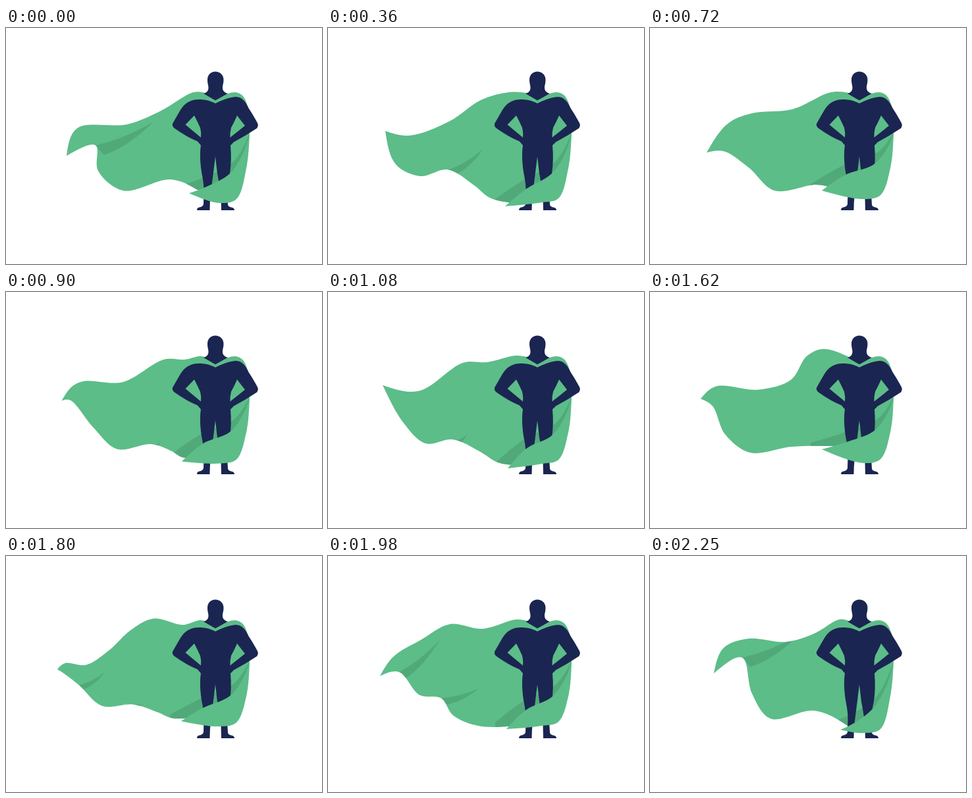
Write an HTML page with a canvas that moves like this. It is 480 px wide and 360 px high and loops after 2.34 s.

```html
<!DOCTYPE html>
<html lang="en">
<head>
<meta charset="utf-8">
<title>Cape in the wind</title>
<style>
html, body { margin: 0; width: 100%; height: 100%; overflow: hidden; background: #fff; }
canvas { display: block; width: 480px; height: 360px; }
</style>
</head>
<body>
<canvas id="stage" width="480" height="360"></canvas>
<script>
const ctx = document.getElementById('stage').getContext('2d');
const GREEN = '#5cbd88', SHADE = '#51a97a', NAVY = '#1b2551';
const LOOP = 2340, STEP = 90;
const SHOULDER = [370, 160], NECK = [302, 99];
const TOP_WAVES = 10, LOW_WAVES = 9;

const mix = (a, b, u) => a.map((v, i) => v + (b[i] - v) * u);
const add = (p, x, y) => [p[0] + x, p[1] + y];
const dist = (a, b) => Math.hypot(a[0] - b[0], a[1] - b[1]);
const pairs = n => Array.from({ length: n.length / 2 }, (_, i) => [n[2 * i], n[2 * i + 1]]);
const poses = [];

// An edge runs from the loose corner past its wave points to the body.
// Waves are numbered, so each keeps its identity while it drifts left.
const edge = (first, pts) => ({ first, pts });

// hem: tip x and y, height at the knee, sag of the fold, lowest height
function pose(time, corner, topFirst, top, lowFirst, low, hem) {
  poses.push({
    time, hem,
    top: edge(topFirst, [corner, ...pairs(top), NECK]),
    low: edge(lowFirst, [corner, ...pairs(low), add(hem, 13, -5)])
  });
}

pose(0, [92, 195], 0, [108,153, 184,147, 234,127, 285,98],
  0, [136,179, 140,218, 178,248, 250,231], [278, 252, 222, 3, 267]);
pose(360, [87, 157], 1, [124,164, 185,142, 232,110, 275,98],
  1, [103,208, 140,226, 182,216, 222,240, 246,259], [269, 272, 222, -4, 266]);
pose(720, [86, 190], 3, [118,146, 155,130, 216,124, 275,98],
  3, [112,188, 150,213, 189,248, 252,239], [261, 248, 208, -6, 261]);
pose(1080, [83, 142], 5, [138,151, 205,108, 242,107, 285,97],
  4, [115,200, 148,231, 190,225, 230,243, 258,260], [273, 269, 219, -9, 262]);
pose(1620, [77, 163], 6, [100,144, 165,149, 214,134, 238,98, 263,87],
  6, [95,174, 114,217, 152,245, 215,236], [261, 240, 212, 2, 261]);
pose(1980, [79, 183], 8, [100,153, 141,128, 185,104, 235,111, 285,97],
  7, [108,177, 139,212, 172,217, 190,243, 228,259], [271, 264, 215, -8, 259]);
pose(2250, [97, 179], 9, [112,140, 150,126, 207,131, 250,118, 287,97],
  9, [140,155, 155,210, 183,248, 250,236], [289, 265, 231, 4, 270]);
poses.push({
  time: LOOP, hem: poses[0].hem,
  top: edge(TOP_WAVES, poses[0].top.pts),
  low: edge(LOW_WAVES, poses[0].low.pts)
});

// Creases start at a wave of the low edge, swell around a time and fade.
const creases = [
  { wave: 0, peak: 0, span: 500, dx: 88, dy: -36 },
  { wave: 3, peak: 360, span: 360, dx: 54, dy: -32 },
  { wave: 6, peak: 1080, span: 300, dx: 22, dy: -9 },
  { wave: 7, peak: 1980, span: 300, dx: 62, dy: -49 },
  { wave: 9, peak: LOOP, span: 600, dx: 88, dy: -36 }
];

const pick = (e, i) => e.pts[Math.max(0, Math.min(e.pts.length - 1, i - e.first + 1))];

function mixEdge(a, b, u) {
  const out = [];
  for (let i = a.first - 1; i <= b.first + b.pts.length - 2; i++) {
    const p = mix(pick(a, i), pick(b, i), u);
    if (!out.length || dist(p, out[out.length - 1]) > 0.5) out.push(p);
  }
  return out;
}

// Centripetal spline through the points, continuing the path.
function spline(path, pts) {
  const handle = (p, q, r) => {
    const d = Math.sqrt(dist(p, q)), e = Math.sqrt(dist(q, r));
    return q.map((v, k) => (d * d * r[k] - e * e * p[k] +
      (2 * d * d + 3 * d * e + e * e) * v) / (3 * d * (d + e)));
  };
  for (let i = 0; i < pts.length - 1; i++) {
    const a = pts[i], b = pts[i + 1];
    const before = pts[i - 1], after = pts[i + 2];
    let h = before && handle(before, a, b);
    const g = after ? handle(after, b, a) : mix(b, h, 0.5);
    h = h || mix(a, g, 0.5);
    path.bezierCurveTo(...h, ...g, ...b);
  }
}

const head = new Path2D(`M318 66.5C325 66.5 330.5 71.5 330.5 79C330.5 85 329 87 329 91
  C329 96 332 98.5 337 100L318 110.5L300 100C305 98.5 307.5 96 307.5 91
  C307.5 87 306 85 306 79C306 71.5 311 66.5 318 66.5Z`);
const body = new Path2D(`M318 115C310 111 303 109 293 109C280 109 271 115 265 125
  Q258 137 253 146Q252 150 256 153Q274 166 291 173L296 179
  C294 192 295 209 298 225Q301 240 300.5 252L300 269Q299 273 292 274Q290 275 290 278
  L309.5 278Q309.5 266 311 252Q314.5 225 318 196L321 222Q325 243 326.5 258
  L327 278L347 278Q347 275 344 274Q337 273 337 269L336 252Q336 239 340 222
  Q343 202 341 179L346 174Q363 165 381 153Q384 149 382 145Q375 132 369 123
  C363 110 357 105 349 105C338 106 328 110 318 115Z
  M286 133.5L272.5 147.5Q284 157 296 167Q297 160 295 152Q291 143 286 133.5Z
  M351 133.5L363 149Q352 158 340.5 167Q340 160 342 152Q347 143 351 133.5Z`);

function fill(path, color, rule = 'nonzero') {
  ctx.fillStyle = color;
  ctx.fill(path, rule);
}

function drawCrease(c, t, a, b, u) {
  const root = mix(pick(a.low, c.wave), pick(b.low, c.wave), u);
  const corner = mix(a.low.pts[0], b.low.pts[0], u);
  const swell = Math.max(0, 1 - ((t - c.peak) / c.span) ** 2);
  const s = swell * Math.min(1, dist(root, corner) / 20);
  if (!s) return;
  const apex = add(root, c.dx * s, c.dy * s * s);
  const end = add(root, c.dx * s / 7, c.dx * s / 6);
  const path = new Path2D();
  path.moveTo(...root);
  path.quadraticCurveTo(...add(mix(root, apex, 0.5), 0, 8 * s), ...apex);
  path.quadraticCurveTo(...add(mix(end, apex, 0.5), 0, 13 * s), ...end);
  fill(path, SHADE);
}

function draw(t) {
  const k = poses.findIndex(p => p.time > t);
  const a = poses[k - 1], b = poses[k];
  const u = (t - a.time) / (b.time - a.time);
  const top = mixEdge(a.top, b.top, u).reverse();
  const low = mixEdge(a.low, b.low, u);

  const [x, y, kneeY, sag, base] = mix(a.hem, b.hem, u);
  const tip = [x, y], knee = [340, kneeY];
  const thigh = [361.5, 160 + (kneeY - 160) * 0.45];
  const shin = add(mix(tip, knee, 0.44), 0, sag);
  const heel = [350, base - 6], side = [365, 214];

  ctx.fillStyle = '#fff';
  ctx.fillRect(0, 0, 480, 360);

  const cape = new Path2D();
  cape.moveTo(...top[0]);
  spline(cape, top);
  spline(cape, low);
  cape.lineTo(...mix(knee, heel, 0.5));
  cape.lineTo(...side);
  cape.lineTo(...SHOULDER);
  cape.bezierCurveTo(371, 135, 368, 110, 358, 102);
  cape.bezierCurveTo(352, 97, 345, 97, 337, 100);
  cape.lineTo(318, 110);
  cape.closePath();
  fill(cape, GREEN);

  ctx.save();
  ctx.clip(cape);
  const under = new Path2D();
  under.moveTo(...SHOULDER);
  spline(under, [SHOULDER, add(knee, 5, -18), add(shin, -2, -15), add(tip, -17, -10)]);
  under.lineTo(x - 17, 290);
  under.lineTo(345, 290);
  under.closePath();
  fill(under, SHADE);
  creases.forEach(c => drawCrease(c, t, a, b, u));
  ctx.restore();

  fill(head, NAVY);
  fill(body, NAVY, 'evenodd');

  const flap = new Path2D();
  flap.moveTo(...SHOULDER);
  spline(flap, [SHOULDER, thigh, knee, shin, tip]);
  spline(flap, [tip, [325, base], heel, side, SHOULDER]);
  fill(flap, GREEN);
}

const start = performance.now();
function tick() {
  const t = (performance.now() - start) % LOOP;
  draw(Math.floor(t / STEP) * STEP);
  requestAnimationFrame(tick);
}
tick();
</script>
</body>
</html>
```
